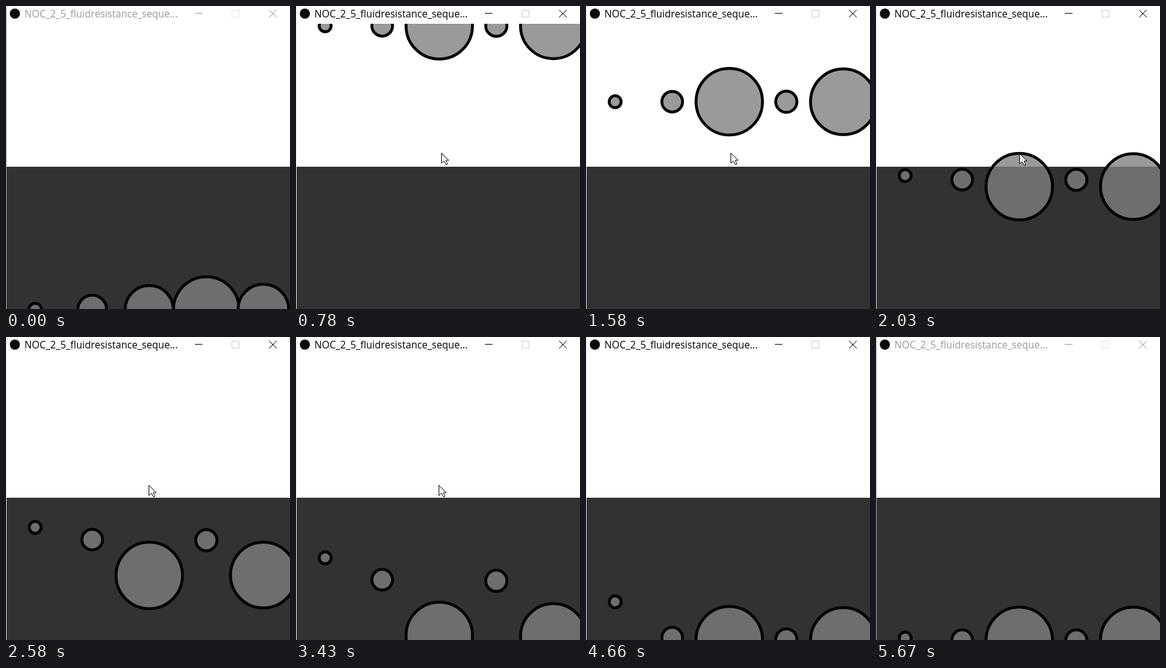
Recreate the animation shown at these times as an HTML page with a canvas. Size 448 by 477 pixels, loop 5.71 s.

```html
<!DOCTYPE html>
<html lang="en">
<head>
<meta charset="utf-8">
<title>Fluid resistance</title>
<style>
  html, body { margin: 0; width: 100%; height: 100%; overflow: hidden; background: #fff; }
  canvas { display: block; }
</style>
</head>
<body>
<canvas id="stage" width="448" height="477"></canvas>
<script>
const ctx = document.getElementById('stage').getContext('2d');
const LOOP = 5710, FOCUS = 600, BLUR = 5410;
const TOP = 28, SIZE = 450, SURFACE = SIZE / 2;
const GRAVITY = 0.1, DRAG = 0.1;
const RELEASE = 638, STEPS_PER_MS = 0.052;

const restingRadii = [10, 22.7, 38, 51.8, 40];
const fallingRadii = [9.4, 16.3, 52.4, 16.7, 51.8];

const progress = (t, from, to) => Math.min(1, Math.max(0, (t - from) / (to - from)));

// Depth at every step: free fall, quadratic drag in the liquid, bounce on the floor
function fall(radius) {
  const mass = radius / 8, path = [0];
  let y = 0, v = 0;
  while (path.length < LOOP * STEPS_PER_MS) {
    const wet = y > SURFACE && y < SIZE;
    v += GRAVITY - (wet ? DRAG * v * Math.abs(v) / mass : 0);
    y += v;
    if (y > SIZE) { v *= -0.9; y = SIZE; }
    path.push(y);
  }
  return path;
}
const paths = fallingRadii.map(fall);

function depth(path, t) {
  const n = Math.max(0, (t - RELEASE) * STEPS_PER_MS), k = Math.floor(n);
  return path[k] + (path[k + 1] - path[k]) * (n - k);
}

function drawBall(i, y, radius) {
  ctx.beginPath();
  ctx.arc(46 + 90 * i, TOP + y, radius, 0, 7);
  ctx.fillStyle = 'rgba(127,127,127,.784)';
  ctx.fill();
  ctx.strokeStyle = '#000';
  ctx.lineWidth = 4.5;
  ctx.stroke();
}

function drawScene(t) {
  ctx.save();
  ctx.beginPath();
  ctx.rect(1, TOP, 447, SIZE);
  ctx.clip();
  ctx.fillStyle = '#323232';
  ctx.fillRect(1, TOP + SURFACE, 447, SURFACE);
  if (t < FOCUS) restingRadii.forEach((r, i) => drawBall(i, SIZE, r));
  else fallingRadii.forEach((r, i) => drawBall(i, depth(paths[i], t), r));
  ctx.restore();
}

function drawWindow(active) {
  const ink = active ? '#000' : '#999';
  ctx.fillStyle = active ? '#e6e6e6' : '#aaa';
  ctx.fillRect(0, 0, 1, 477);
  ctx.fillStyle = '#0b0b0b';
  ctx.beginPath();
  ctx.arc(14, 12, 8, 0, 7);
  ctx.fill();

  ctx.fillStyle = ink;
  ctx.font = '15.6px "Open Sans", "Noto Sans", sans-serif';
  ctx.fillText('NOC_2_5_fluidresistance_seque...', 29, 18);

  ctx.lineWidth = 1;
  ctx.strokeStyle = ink;
  ctx.stroke(new Path2D('M298 11.5h12M415 6l12 12M427 6l-12 12'));
  ctx.strokeStyle = active ? '#ccc' : '#e2e2e2';
  ctx.strokeRect(356.5, 6.5, 11, 11);
}

const arrow = new Path2D('M0 0V16L4 12.5L7 18H9V16L7 11.5H11.5Z');

// The pointer darts in from below, drifts a little, then leaves the same way
function drawPointer(t) {
  if (t < 180) return;
  const away = (1 - progress(t, 180, 400)) ** 2;
  const drift = progress(t, 1400, 2300);
  const leave = progress(t, 3900, 4350) ** 2;
  const x = Math.round(229 + 60 * away - 4 * drift + 60 * leave);
  const y = Math.round(231 + 196 * away + 2 * drift + 247 * leave);
  ctx.save();
  ctx.translate(x + 0.5, y + 0.5);
  ctx.fillStyle = '#fff';
  ctx.fill(arrow);
  ctx.strokeStyle = '#000';
  ctx.lineWidth = 1;
  ctx.stroke(arrow);
  ctx.restore();
}

const start = performance.now();
function draw() {
  const t = (performance.now() - start) % LOOP;
  ctx.fillStyle = '#fff';
  ctx.fillRect(0, 0, 448, 477);
  drawScene(t);
  drawWindow(t >= FOCUS && t < BLUR);
  drawPointer(t);
  requestAnimationFrame(draw);
}
draw();
</script>
</body>
</html>
```
